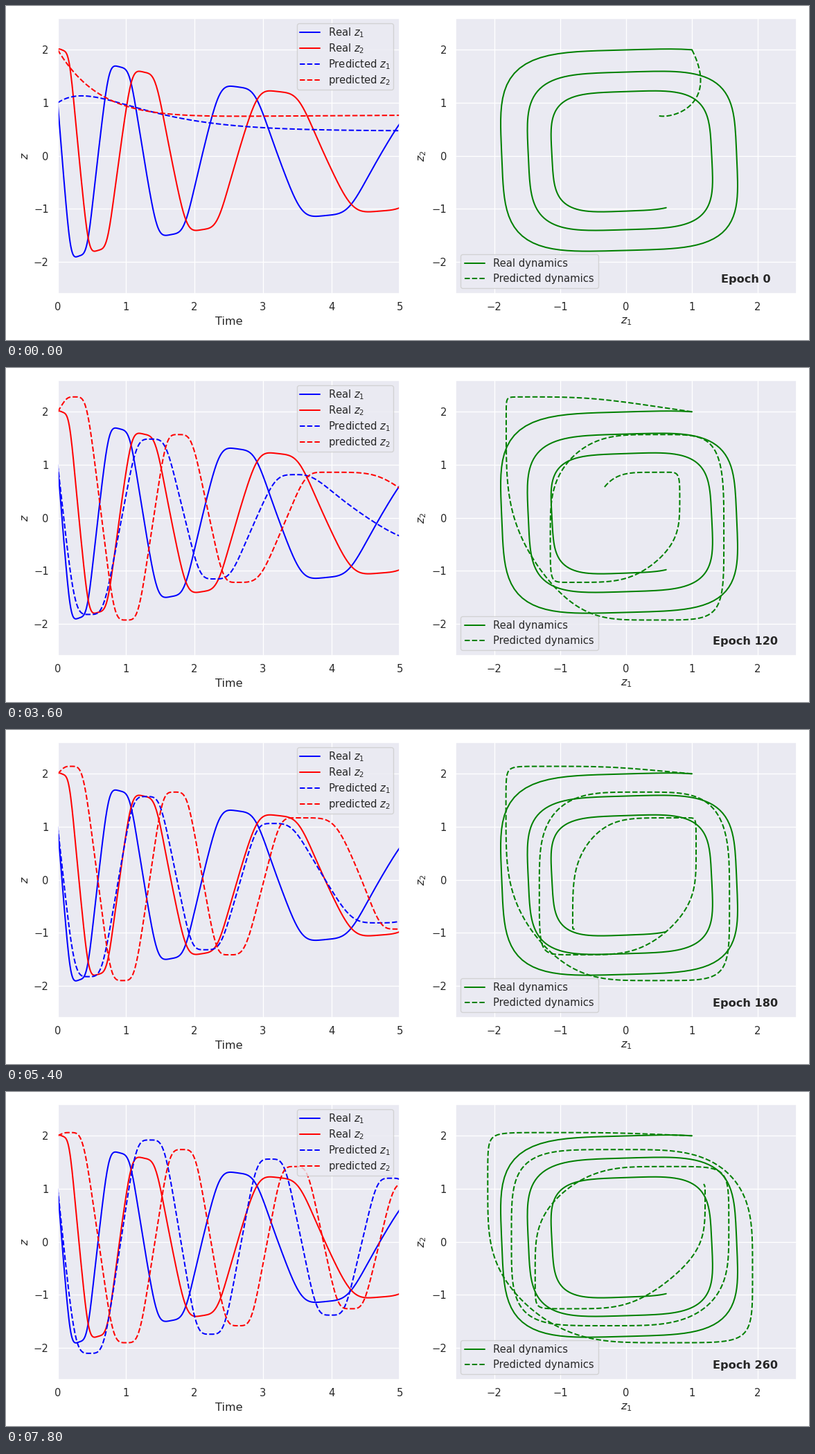
Recreate the animation shown at these times as a matplotlib script. Size 1159 px wide and 483 px high, loop 8 s.

```python
import numpy as np
import matplotlib.pyplot as plt
from matplotlib.animation import FuncAnimation

W, H, DPI = 1159, 483, 100
T_END, LIM = 5, 2.59
STEP_MS, HOLD, FRAMES = 200, 3, 40
EPOCH_STEP = 20
START = (1, 2)

plt.rcParams.update({
    "font.family": "DejaVu Sans",
    "font.size": 11.59,
    "axes.labelsize": 11.59,
    "axes.labelpad": 3.86,
    "xtick.labelsize": 10.62,
    "ytick.labelsize": 10.62,
    "legend.fontsize": 10.62,
    "legend.edgecolor": "0.8",
    "patch.linewidth": 0.97,
    "text.color": "0.15",
    "axes.labelcolor": "0.15",
    "xtick.color": "0.15",
    "ytick.color": "0.15",
    "axes.facecolor": "#EAEAF2",
    "axes.edgecolor": "white",
    "axes.linewidth": 1.2,
    "axes.axisbelow": True,
    "grid.color": "white",
    "grid.linewidth": 0.97,
    "lines.linewidth": 1.45,
    "lines.solid_capstyle": "round",
})


def integrate(z, times, spin, cubic, linear, sub=4):
    """Runge-Kutta path of a damped cubic oscillator."""
    def velocity(z):
        x, y = z ** 3
        return (np.array([-cubic * x - spin * y, spin * x - cubic * y])
                - linear * z)

    z = np.array(z, float)
    path = [z]
    h = (times[1] - times[0]) / sub
    for _ in times[1:]:
        for _ in range(sub):
            k1 = velocity(z)
            k2 = velocity(z + h / 2 * k1)
            k3 = velocity(z + h / 2 * k2)
            k4 = velocity(z + h * k3)
            z = z + h / 6 * (k1 + 2 * k2 + 2 * k3 + k4)
        path.append(z)
    return np.array(path).T


times = np.linspace(0, T_END, 500)
real = integrate(START, times, spin=1.98, cubic=.0557, linear=.0395)

# Half a turn of the undamped oscillator eases between turning points.
HALF_TURN = 3.708
ease_s = np.linspace(0, 1, 200)
ease_u = (1 - integrate((1, 0), ease_s * HALF_TURN, 1, 0, 0)[0]) / 2

# Swings of z1 and z2 as training goes on:
# first turn, half period, slowing, first height, loss per turn, lean
EPOCHS = (80, 120, 160, 220, 260)
SWINGS = (
    np.array([(.47, .86, .0026, 1.81, .455, -.8),
              (.46, .90, .00046, 1.82, .335, -.45),
              (.43, .83, .00022, 1.885, .27, -.25),
              (.48, .88, .0002, 1.70, .22, -.3),
              (.47, .88, 0, 2.10, .18, 0)]),
    np.array([(.25, .70, .0006, 2.18, .42, .15),
              (.25, .75, .00016, 2.28, .355, .2),
              (.22, .74, .00006, 2.22, .264, .9),
              (.15, .78, .00007, 1.98, .20, .9),
              (.18, .82, 0, 2.06, .16, 0)]),
)
SIGNS = (-1, 1)

# Turning points (t, z) of the early inward spiral, and its lean
SPIRAL_EPOCH = 40
SPIRAL = (
    (np.array([(.48, -1.72), (1.95, .62), (3.35, .04), (5.2, .38)]), -1),
    (np.array([(.2, 2.02), (1.05, -.57), (2.5, .56), (4.35, .325), (6, .42)]), .5),
)


def mix(a, b, f):
    return a + (b - a) * f


def swing(epoch, k):
    """Turning points and lean of one coordinate."""
    t0, half, slow, height, loss, lean = [
        np.interp(epoch, EPOCHS, col) for col in SWINGS[k].T]
    m = np.arange(7)
    t = t0 + half * m + slow * m ** 6
    z = SIGNS[k] * (-1.0) ** m * (height - loss * m)
    turns = np.column_stack([t, z])
    if epoch < EPOCHS[0]:
        early, early_lean = SPIRAL[k]
        f = (epoch - SPIRAL_EPOCH) / (EPOCHS[0] - SPIRAL_EPOCH)
        turns = mix(early, turns[:len(early)], f)
        lean = mix(early_lean, lean, f)
    return turns, lean


def wave(epoch, k):
    turns, lean = swing(epoch, k)
    t, z = turns.T
    # a mirrored turn before zero makes the curve pass through its start
    t, z = np.r_[-t[0], t], np.r_[2 * START[k] - z[0], z]
    i = np.clip(np.searchsorted(t, times, side="right") - 1, 0, len(t) - 2)
    gap = t[i + 1] - t[i]
    s = np.clip((times - t[i]) / gap, 0, 1)
    s = s ** (np.maximum(gap / .95, 1) ** lean)
    return mix(z[i], z[i + 1], np.interp(s, ease_s, ease_u))


def settle(k):
    """Untrained curve: a damped approach to a rest value."""
    rest, rate, push = ((.47, 1.5, 1.68), (.77, 1.2, -.67))[k]
    return rest + np.exp(-rate * times) * (START[k] - rest + push * times)


def predict(epoch, k):
    f = min(epoch / SPIRAL_EPOCH, 1)
    return mix(settle(k), wave(max(epoch, SPIRAL_EPOCH), k), f)


def panel(left, right, xlabel, ylabel):
    top, bottom = 18, 415.5
    ax = fig.add_axes([left / W, 1 - bottom / H, (right - left) / W, (bottom - top) / H])
    ax.set(xlabel=xlabel, ylabel=ylabel, ylim=(-LIM, LIM), yticks=range(-2, 3))
    ax.grid(True)
    ax.tick_params(length=0, pad=9.18)
    return ax


fig = plt.figure(figsize=(W / DPI, H / DPI), dpi=DPI, facecolor="white")

series = panel(74.6, 568.4, "Time", "$z$")
series.set(xlim=(0, T_END), xticks=range(6))
series.plot(times, real[0], "b", label="Real $z_1$")
series.plot(times, real[1], "r", label="Real $z_2$")
pred1, = series.plot([], [], "b--", label="Predicted $z_1$")
pred2, = series.plot([], [], "r--", label="predicted $z_2$")
series.legend(loc="upper right", bbox_to_anchor=(.996, 1),
              labelspacing=.28, borderpad=.27)

phase = panel(648.7, 1141.2, "$z_1$", "$z_2$")
phase.set(xlim=(-LIM, LIM), xticks=range(-2, 3))
phase.plot(*real, "g", label="Real dynamics")
orbit, = phase.plot([], [], "g--", label="Predicted dynamics")
phase.legend(loc="lower left")
caption = fig.text(1067.5 / W, 1 - 400.3 / H, "", ha="center", va="baseline",
                   weight="bold")


def draw(i):
    epoch = i // HOLD * EPOCH_STEP
    z1, z2 = predict(epoch, 0), predict(epoch, 1)
    pred1.set_data(times, z1)
    pred2.set_data(times, z2)
    orbit.set_data(z1, z2)
    caption.set_text(f"Epoch {epoch}")
    return pred1, pred2, orbit, caption


anim = FuncAnimation(fig, draw, frames=FRAMES, interval=STEP_MS, repeat=True)
plt.show()
```
